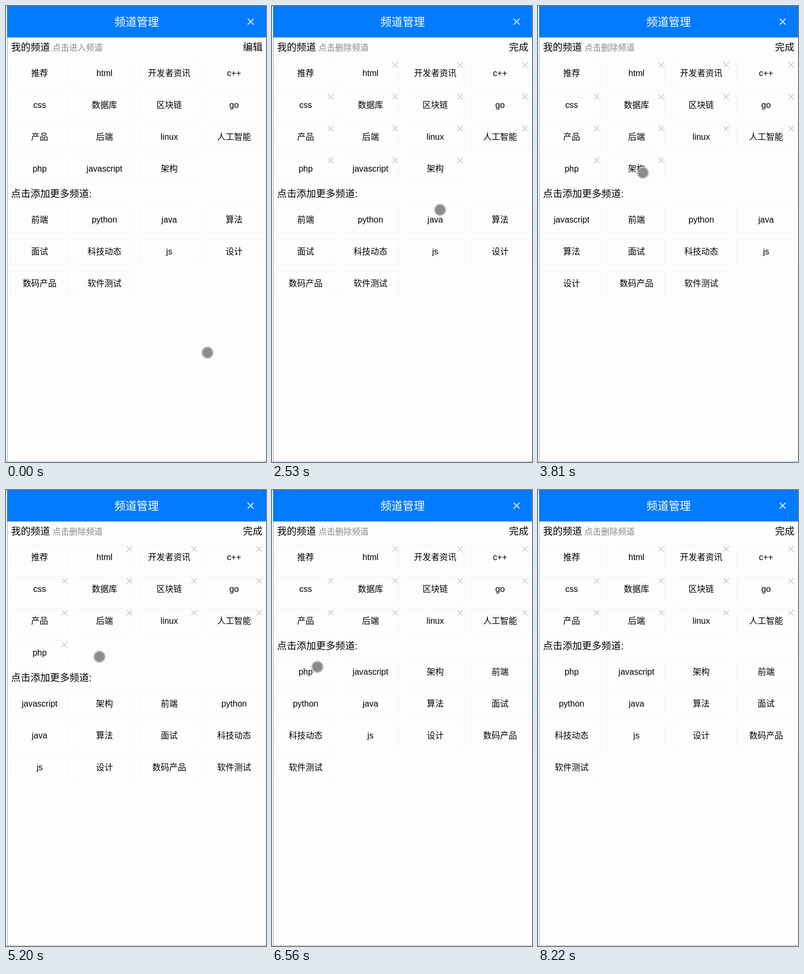
These frames come from a looping animation (491 by 859 pixels, 8.97 s). An HTML page:

```html
<!DOCTYPE html>
<html lang="zh-CN">
<head>
<meta charset="utf-8">
<title>频道管理</title>
<style>
  html, body { margin: 0; width: 100%; height: 100%; overflow: hidden; background: #fdfdfd; }
  svg { display: block; width: 491px; height: 859px; }
  text { font: 350 16px "Liberation Sans", "Noto Sans CJK SC", "Noto Sans CJK", sans-serif; fill: #000; }
  .title { font-size: 21px; fill: #fff; }
  .head { font-size: 18.4px; }
  .hint { font-size: 15.8px; fill: #888; }
  .mid { text-anchor: middle; }
  .end { text-anchor: end; }
  .tile { fill: none; stroke: #f3f4f5; }
  .x { fill: none; stroke: #c8c9cc; stroke-width: 1.5; }
</style>
</head>
<body>
<svg viewBox="0 0 491 859">
  <rect width="491" height="859" fill="#fdfdfd"/>
  <rect x="2" y="59" width="1" height="800" fill="#a8a8a8"/>
  <rect y="858" width="491" height="1" fill="#b4b4b4"/>
  <rect x="2" width="489" height="59.3" fill="#007bff"/>
  <text class="title mid" x="246.7" y="37">频道管理</text>
  <path d="M456.5 24l11 11m0-11l-11 11" fill="none" stroke="#fff" stroke-width="1.7"/>
  <text class="head" x="9.5" y="84">我的频道</text>
  <g id="page"></g>
  <g id="dot">
    <circle r="11.4" fill="#bdbdbd"/>
    <circle r="9.2" fill="#8c8c8c"/>
  </g>
</svg>
<script>
const LOOP = 8970, STEP = 135, EDIT = 2130, TOP = 103, ROW = 60;
const mine = '推荐 html 开发者资讯 c++ css 数据库 区块链 go 产品 后端 linux 人工智能 php javascript 架构'.split(' ');
const rest = '前端 python java 算法 面试 科技动态 js 设计 数码产品 软件测试'.split(' ');
const all = [...mine, ...rest];
const removals = [[3390, 'javascript'], [4240, '架构'], [6020, 'php']];

// Pointer glides: start time, number of steps, end point
const home = [380.5, 653];
const glides = [
  [1150, 2, 428.5, 206.5], [1430, 2, 461, 98], [1690, 2, 470.5, 82],
  [2390, 2, 317.5, 384], [2665, 4, 212.5, 305.5], [3690, 1, 198, 314],
  [5200, 1, 176.5, 314], [5350, 3, 66, 321],
  [7520, 1, 89.5, 362], [7795, 2, 306.5, 671], [8070, 1, 411.5, 851]
];
const hidden = [[3540, 3690], [7250, 7520], [8220, LOOP]];
const orbit = { from: 6560, to: 7250, x: 70, y: 338, r: 16.5 };

const $ = id => document.getElementById(id);
const text = (cls, x, y, s) => `<text class="${cls}" x="${x}" y="${y}">${s}</text>`;

function grid(names, top, closable) {
  return names.map((name, i) => {
    const x = 63.5 + 122.4 * (i % 4), y = top + ROW * Math.floor(i / 4);
    const left = Math.round(x - 55.5) + 0.5;
    const close = closable && i > 0
      ? `<path class="x" d="M${x + 42} ${y + 3}l10 10m0-10l-10 10"/>` : '';
    return `<rect class="tile" x="${left}" y="${y + 0.5}" width="109" height="47"/>`
      + text('mid', x, y + 29, name) + close;
  }).join('');
}

function page(editing, gone) {
  const kept = mine.filter(n => !gone.includes(n));
  const more = all.filter(n => !kept.includes(n));
  const end = TOP + ROW * Math.ceil(kept.length / 4);
  return text('hint', 87.7, 84, editing ? '点击删除频道' : '点击进入频道')
    + text('head end', 484.3, 84, editing ? '完成' : '编辑')
    + grid(kept, TOP, editing)
    + text('head', 9.5, end + 17, '点击添加更多频道:')
    + grid(more, end + 36, false);
}

function pointer(t) {
  if (t >= orbit.from && t < orbit.to) {
    const a = -0.3 - Math.floor((t - orbit.from) / STEP) * Math.PI / 2;
    return [orbit.x + orbit.r * Math.cos(a), orbit.y + orbit.r * Math.sin(a)];
  }
  let [x, y] = home;
  for (const [start, n, endX, endY] of glides) {
    if (t < start) break;
    const k = Math.min(n, Math.floor((t - start) / STEP) + 1);
    const left = (1 - k / n) ** 1.5;
    x = endX + (x - endX) * left;
    y = endY + (y - endY) * left;
  }
  return [x, y];
}

let shown = '';
function draw(t) {
  const editing = t >= EDIT;
  const gone = removals.filter(r => t >= r[0]).map(r => r[1]);
  const key = editing + gone.join();
  if (key !== shown) {
    shown = key;
    $('page').innerHTML = page(editing, gone);
  }
  const off = hidden.some(([a, b]) => t >= a && t < b);
  $('dot').setAttribute('visibility', off ? 'hidden' : 'visible');
  $('dot').setAttribute('transform', `translate(${pointer(t)})`);
}

const start = performance.now();
function tick() {
  draw((performance.now() - start) % LOOP);
  requestAnimationFrame(tick);
}
tick();
</script>
</body>
</html>
```
